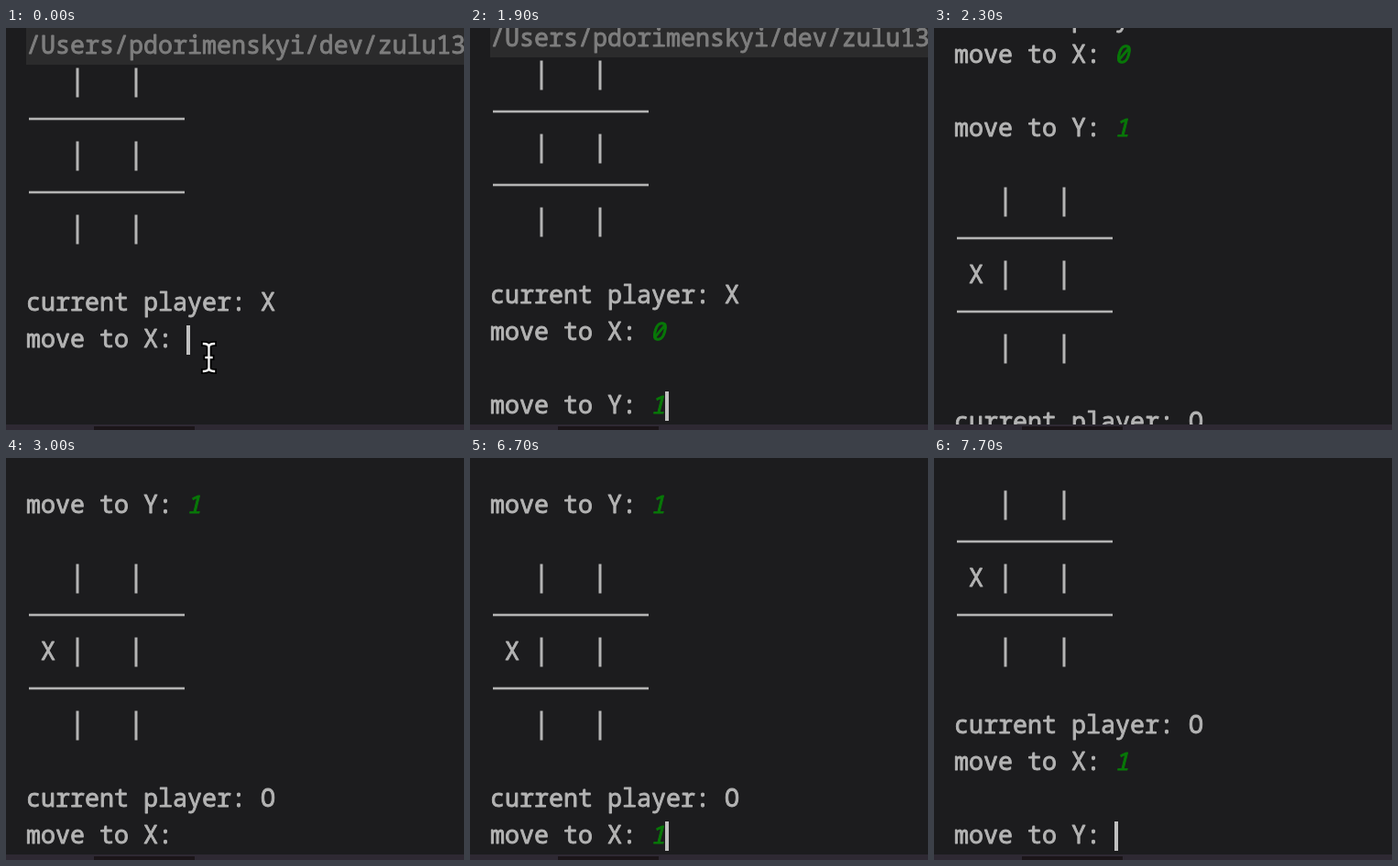
Recreate the animation shown at these times as an HTML page with a canvas. Size 500x438 px, loop 8000 ms.

```html
<!DOCTYPE html>
<html lang="en">
<head>
<meta charset="utf-8">
<title>Tic-tac-toe console</title>
<style>
  html, body { margin: 0; width: 100%; height: 100%; overflow: hidden; background: #1c1c1e; }
  canvas { display: block; width: 500px; height: 438px; }
</style>
</head>
<body>
<canvas id="stage"></canvas>
<script>
const W = 500, H = 438, LOOP = 8000;
const LEFT = 22, ADVANCE = 16, ROW = 40, BASELINE = 28, FLOOR = 432;
const FONT = '26.67px "Noto Sans Mono", "DejaVu Sans Mono", monospace';
const COLOR = { bg: '#1c1c1e', text: '#b4b4b4', path: '#7e7e7e', band: '#2b2b2c',
                input: '#087808', caret: '#c0c0c0', bar: '#2e2933', tab: '#1b1519' };

const canvas = document.getElementById('stage');
const ctx = canvas.getContext('2d');
const dpr = window.devicePixelRatio || 1;
canvas.width = W * dpr;
canvas.height = H * dpr;

// Console output, one entry per row
const cells = mark => ({ cells: true, mark });
const rule = { rule: true };
const board = mark => [cells(), rule, cells(mark), rule, cells()];
const say = (text, input, at) => ({ text, input, at });
const blank = {};

const rows = [
  { path: '/Users/pdorimenskyi/dev/zulu13' },
  ...board(), blank,
  say('current player: X'),
  say('move to X:', '0', 400), blank,
  say('move to Y:', '1', 1900), blank,
  ...board('X'), blank,
  say('current player: O'),
  say('move to X:', '1', 6700), blank,
  say('move to Y:')
];

// [start, last row shown, scroll, caret column]
const states = [
  [0, 8, 0, 11], [400, 8, 0, 12], [800, 9, 0, 0],
  [1000, 10, 8, 11], [1900, 10, 8, 12], [2100, 11, 48, 0],
  [2300, 19, 310, 11], [2400, 19, 368, 11],
  [6700, 19, 368, 12], [7500, 20, 408, 0], [7700, 21, 448, 11]
];

const caretOn = t => t < 3000 || t >= 6500 || Math.floor(t / 500) % 2 === 1;

function box(color, x, y, w, h) {
  ctx.fillStyle = color;
  ctx.fillRect(x, y, w, h);
}

// A thin stroke gives the regular face a medium weight
function write(text, col, y, color, italic) {
  const x = LEFT + col * ADVANCE - (italic ? 1 : 0);
  ctx.font = (italic ? 'italic ' : '') + FONT;
  ctx.fillStyle = ctx.strokeStyle = color;
  ctx.lineWidth = 0.9;
  ctx.fillText(text, x, y + BASELINE);
  ctx.strokeText(text, x, y + BASELINE);
}

function drawRow(row, y, t) {
  if (row.path) {
    box(COLOR.band, LEFT, y, W - LEFT, ROW);
    write(row.path, 0, y, COLOR.path);
  }
  if (row.cells) {
    for (const x of [76.5, 140.5]) box(COLOR.text, x, y + 3.5, 3, 32);
    if (row.mark) write(row.mark, 1, y, COLOR.text);
  }
  if (row.rule) box(COLOR.text, 25, y + 17.7, 170, 2.6);
  if (row.text) write(row.text, 0, y, COLOR.text);
  if (row.input && t >= row.at) write(row.input, 11, y, COLOR.input, true);
}

function drawPointer(x, y) {
  const beam = new Path2D();
  for (const s of [-1, 1]) {
    beam.moveTo(x - 5.5, y + s * 15);
    beam.quadraticCurveTo(x, y + s * 15, x, y + s * 11);
    beam.quadraticCurveTo(x, y + s * 15, x + 5.5, y + s * 15);
  }
  beam.moveTo(x, y - 12);
  beam.lineTo(x, y + 12);
  beam.moveTo(x - 3, y);
  beam.lineTo(x + 3, y);
  ctx.lineCap = 'square';
  for (const [color, width] of [['#000', 6], ['#f2f2f2', 2.4]]) {
    ctx.strokeStyle = color;
    ctx.lineWidth = width;
    ctx.stroke(beam);
  }
}

function draw(t) {
  const [, last, scroll, col] = states.findLast(s => s[0] <= t);
  ctx.setTransform(dpr, 0, 0, dpr, 0, 0);
  ctx.lineJoin = 'round';
  box(COLOR.bg, 0, 0, W, H);

  for (let i = 0; i <= last; i++) {
    const y = i * ROW - scroll;
    if (y > -ROW && y < FLOOR) drawRow(rows[i], y, t);
  }
  if (caretOn(t)) {
    const x = Math.max(LEFT, LEFT + col * ADVANCE - 1);
    box(COLOR.caret, x, last * ROW - scroll + 4, 4, 32);
  }
  box(COLOR.bar, 0, FLOOR, W, H - FLOOR);
  box(COLOR.tab, 96, FLOOR + 2, 110, H - FLOOR - 2);
  if (t < 400) drawPointer(221.5, 359);
}

const start = performance.now();
function tick() {
  draw((performance.now() - start) % LOOP);
  requestAnimationFrame(tick);
}
tick();
</script>
</body>
</html>
```
